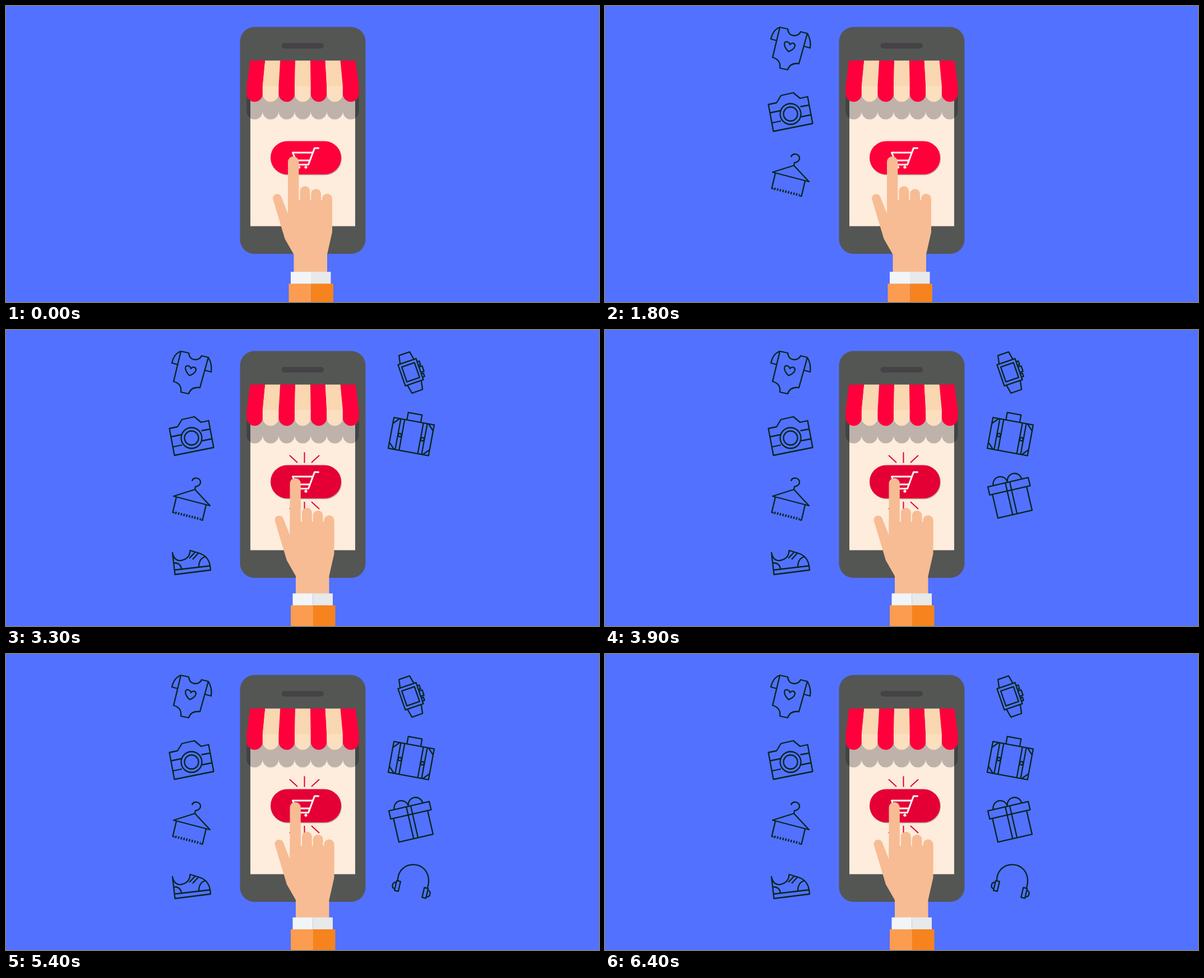
Write an HTML page that moves like this. It is 1058 by 529 pixels and loops after 7400 ms.

```html
<!DOCTYPE html>
<html lang="en">
<head>
<meta charset="utf-8">
<title>Mobile shopping</title>
<style>
  html, body { margin: 0; width: 100%; height: 100%; overflow: hidden; background: #5271ff; }
  svg { display: block; width: 100vw; height: 100vh; }
  .icons { fill: none; stroke: #06251f; stroke-width: 2.3; stroke-linejoin: round; }
  .cart { fill: none; stroke: #fff; stroke-width: 3; stroke-linejoin: round; stroke-linecap: round; }
  .rays { stroke: #e40035; stroke-width: 2; }
  .skin { fill: #f7bc93; }
</style>
</head>
<body>
<svg viewBox="0 0 1058 529">
  <g class="icons" id="icons">
    <g><!-- baby suit -->
      <path d="M312 38L326 41Q327 52 337 53Q346 53 349 46L361 49Q368 60 366 75L355 72M361 49L346 103Q330 101 326 114L312 111Q314 96 299 92L312 38Q300 42 296 59L307 62"/>
      <path d="M327.500 81.500C318 72 318 63 325 64Q329 65 330 69Q333 65 337 67C342 71 337 78 327.500 81.500Z"/>
    </g>
    <g><!-- camera -->
      <path d="M291.500 176L306 173L314 160L336 155L348 165L361.500 162L370.500 210L300.500 224ZM294 191L313 187M348.500 180L364.500 177M297.500 209L314 205.500M350 198L367.500 194.500"/>
      <circle cx="331" cy="193" r="18.500"/><circle cx="331" cy="193" r="12.500"/>
    </g>
    <g><!-- hanger -->
      <path d="M332 270C333 264 341 263 345 267C350 273 345 279 338 280L337 285L299 297L364 314L337 285M304 298.500L297.500 326L301 327M357 312.500L350.500 340L347 339"/>
      <path d="M302 326.500L347 338" stroke-width="4.500" stroke-dasharray="2.400 2.600"/>
    </g>
    <g><!-- shoe -->
      <path d="M297 398Q300 413 312 412Q328 409 328.500 394L345 399Q361 404 364 421L365 429L301.500 437ZM300 429L364 421.500M299 416Q312 416 313 427.500M344 424Q344 408 356 405M327 408L337 397.500M333 410L343 399"/>
    </g>
    <g transform="translate(722 75.500) rotate(-19)"><!-- watch -->
      <path d="M-17-20H17V20H-17ZM-12-14H12V14H-12ZM-13-20L-10-35H10L13-20M-13 20L-10 36H10L13 20M17-14H21V-7H17M17-4H23V6H17M17 9H21V15H17"/>
    </g>
    <g transform="translate(723 190.500) rotate(10.500)"><!-- suitcase -->
      <path d="M-36.500-28H36.500V28H-36.500ZM-13-28V-41.500H12V-28M-24-28V28M-17-28V28M17-28V28M24-28V28M-36.500-17L-26-28M36.500-17L26-28M-36.500 17L-26 28M36.500 17L26 28"/>
      <circle cx="-20.500" cy="1" r="3"/><circle cx="20.500" cy="1" r="3"/>
    </g>
    <g transform="translate(722 298) rotate(-13)"><!-- gift -->
      <path d="M-34-26H40V-11H-34ZM-29-11V32.500H33.500V-11M-2-26V32.500M6-26V32.500M-24-26A13 13 0 0 1 2-26A13 13 0 0 1 28-26"/>
    </g>
    <g><!-- headphones -->
      <path d="M699 406C698 366 757 366 754 409L752 419"/>
      <path id="cup" transform="translate(698.500 414.500) rotate(13)" d="M-3.500-9H3.500V9H-3.500ZM-3.500-6Q-9-5-9 0Q-9 6-3.500 6"/>
      <path transform="translate(747.800 427) rotate(13)" d="M-3.500-9H3.500V9H-3.500ZM3.500-6Q9-5 9 0Q9 6 3.500 6"/>
    </g>
  </g>

  <rect x="417.500" y="37.500" width="224" height="405.500" rx="26" fill="#545654"/>
  <rect x="491.500" y="66" width="75.500" height="10" rx="5" fill="#454345"/>
  <rect x="436" y="98" width="187" height="295.500" fill="#feecdc"/>
  <path id="shade" fill="rgba(5,15,30,.26)"/>
  <g id="awning"></g>

  <g class="rays" id="rays">
    <path d="M506 224L520 237M532.500 218.500V237.500M559 224L545 237M506 320L520 307M532.500 307V325M559 320L545 307"/>
  </g>
  <rect x="473" y="243" width="126" height="59.500" rx="29.700" fill="#bbb3ac"/>
  <rect id="button" x="472" y="241.500" width="126" height="59.500" rx="29.700"/>
  <path class="cart" d="M557.500 254H550.500L539.500 283.500H518M547.500 262H511.500L517.500 276H542"/>
  <circle cx="522.500" cy="288" r="2.600" fill="#fff"/>
  <circle cx="535" cy="288" r="2.600" fill="#fff"/>

  <g id="hand">
    <path class="skin" d="M503 347H582V404L573 444V476H513.500V444L497.500 416L476.800 347A7.600 7.600 0 0 1 491 340.500L503 371Z"/>
    <g class="skin">
      <rect x="503" y="269" width="19.300" height="120" rx="9.600"/>
      <rect x="524.500" y="322" width="17.800" height="60" rx="8.900"/>
      <rect x="544.200" y="327" width="17.800" height="60" rx="8.900"/>
      <rect x="564" y="335.500" width="18" height="60" rx="9"/>
    </g>
    <path fill="#f1f5f8" d="M508 475H544V497H508Z"/>
    <path fill="#e7e9eb" d="M544 475H579.500V497H544Z"/>
    <path fill="#fb9c50" d="M504.500 496.300H544.500V540H504.500Z"/>
    <path fill="#f6831d" d="M544.500 496.300H584V540H544.500Z"/>
  </g>
</svg>
<script>
  const LOOP = 7400, FIRST = 300, GAP = 600, PRESS = 300, FINALE = 4900, BLINK = 500;
  const byId = id => document.getElementById(id);
  const icons = [...byId('icons').children];

  function drawAwning() {
    const stripes = 7, left = 429.3, width = 28.6, topLeft = 435.5, topWidth = 26.85;
    const r = width / 2;
    let parts = '', scallops = '';
    for (let i = 0; i < stripes; i++) {
      const x = left + i * width, tx = topLeft + i * topWidth;
      const [upper, lower] = i % 2 ? ['#f9d7b0', '#fbdfbf'] : ['#ff003c', '#ff003c'];
      parts += `<path fill="${upper}" d="M${tx} 97.500h${topWidth}L${x + width} 143.500h${-width}Z"/>` +
        `<path fill="${lower}" d="M${x} 143v14a${r} ${r} 0 0 0 ${width} 0v-14Z"/>`;
      scallops += `a${r} ${r} 0 0 0 ${width} 0`;
    }
    byId('awning').innerHTML = parts;
    byId('shade').setAttribute('d', `M${left} 150V188.300${scallops}V150Z`);
  }

  function stateAt(t) {
    if (t >= FINALE) {
      const on = t >= 6400 || Math.floor((t - FINALE) / BLINK) % 2 === 1;
      return { shown: on ? icons.length : 0, pressed: on };
    }
    const shown = t < FIRST ? 0 : Math.floor((t - FIRST) / GAP) + 1;
    const sincePress = t - FIRST - (shown - 1) * GAP;
    return { shown, pressed: shown === icons.length || (shown > 0 && sincePress < PRESS) };
  }

  function render(now) {
    const { shown, pressed } = stateAt(now % LOOP);
    icons.forEach((icon, i) => icon.style.display = i < shown ? '' : 'none');
    byId('rays').style.display = pressed ? '' : 'none';
    byId('button').setAttribute('fill', pressed ? '#e40035' : '#ff003a');
    byId('hand').setAttribute('transform', pressed ? 'translate(3.500 -4.300)' : '');
  }

  drawAwning();
  const start = performance.now();
  function tick() {
    render(performance.now() - start);
    requestAnimationFrame(tick);
  }
  tick();
</script>
</body>
</html>
```
